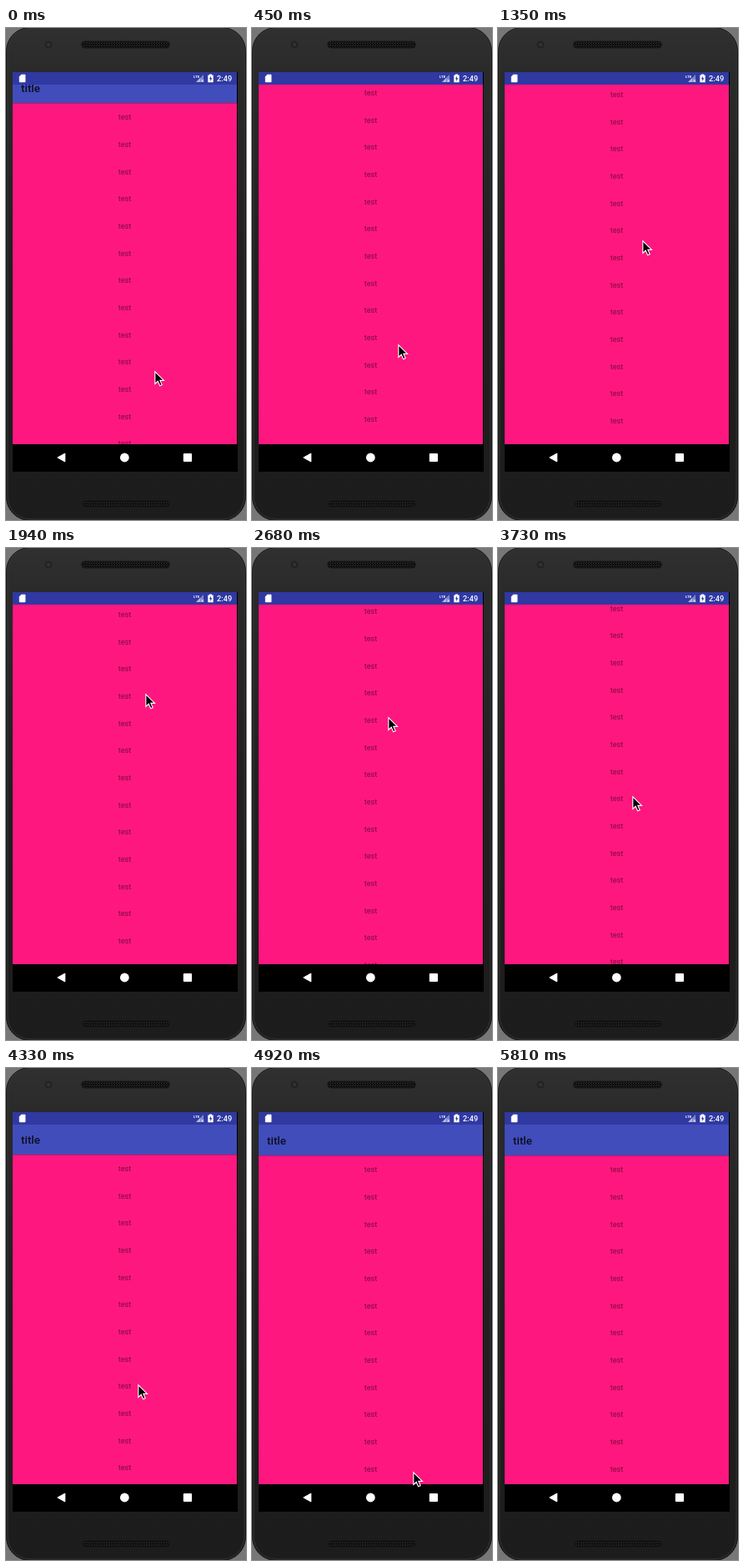
These frames come from a looping animation (288 by 591 pixels, 6.11 s). An HTML page:

```html
<!DOCTYPE html>
<html lang="en">
<head>
<meta charset="utf-8">
<title>Collapsing toolbar</title>
<style>
html, body { margin: 0; width: 100%; height: 100%; overflow: hidden; background: #777; }
svg { display: block; width: 288px; height: 591px; font-family: Roboto, sans-serif; }
</style>
</head>
<body>
<svg viewBox="0 0 288 591">
  <defs>
    <linearGradient id="body" x2="0" y2="1">
      <stop offset="0" stop-color="#303030"/>
      <stop offset=".09" stop-color="#2a2a2a"/>
      <stop offset=".5" stop-color="#202020"/>
      <stop offset="1" stop-color="#1c1c1c"/>
    </linearGradient>
    <pattern id="mesh" width="3" height="3" patternUnits="userSpaceOnUse">
      <rect width="3" height="3" fill="#0e0e0e"/>
      <rect width="1" height="1" fill="#333"/>
      <rect x="1" y="2" width="1" height="1" fill="#2a2a2a"/>
    </pattern>
    <clipPath id="content"><rect x="8" y="68" width="269" height="432"/></clipPath>
  </defs>

  <rect x=".5" y="-.5" width="287" height="592" rx="28" fill="url(#body)" stroke="#161616"/>
  <rect x="2" y="1" width="284" height="589" rx="27" fill="none" stroke="#343434"/>
  <circle cx="51" cy="20" r="4.5" fill="#232323"/>
  <circle cx="51" cy="20" r="2" fill="#353535"/>
  <g fill="url(#mesh)" stroke="#191919">
    <rect x="90.5" y="16" width="106" height="8" rx="4"/>
    <rect x="91.5" y="567.5" width="105" height="8" rx="4"/>
  </g>
  <rect x="8" y="53" width="270" height="480"/>

  <g clip-path="url(#content)">
    <rect x="8" y="68" width="269" height="432" fill="#ff1780"/>
    <g id="list" font-size="9.2" text-anchor="middle" fill-opacity=".52"></g>
    <g id="toolbar">
      <rect x="8" y="105" width="269" height="1" fill-opacity=".2"/>
      <rect x="8" y="60" width="269" height="45" fill="#414dbb"/>
      <text x="18" y="91.5" font-size="13.4" font-weight="500" fill="#0d0f22">title</text>
    </g>
  </g>

  <rect x="8" y="53" width="269" height="15" fill="#3039a2"/>
  <g fill="#fff">
    <path d="M18.4 55.8h4.2q.8 0 .8.8v7.8q0 .8-.8.8h-6q-.8 0-.8-.8v-6z"/>
    <path d="M228 65l9-9v9z" fill-opacity=".4"/>
    <path d="M228 65l5-5v5z" fill-opacity=".4"/>
    <text x="225" y="59.5" font-size="4.4" font-weight="700">LTE</text>
    <path d="M234.3 62l3 3m0-3l-3 3" stroke="#fff" stroke-width=".8"/>
    <path d="M244 55.5h3v1h1.7v8.7h-6.4v-8.7h1.7z"/>
    <path d="M246 57.7l-2.2 3.6h1.4v2.6l2.2-3.7h-1.4z" fill="#3039a2"/>
    <text x="253" y="64" font-size="9.2" font-weight="500">2:49</text>
    <path d="M61.8 516l9-5v10z" stroke="#fff" stroke-linejoin="round"/>
    <circle cx="142.3" cy="516" r="5.4"/>
    <rect x="212.8" y="511" width="10.2" height="10" rx="1"/>
  </g>

  <path id="pointer" d="M.8 1.8v14.7l3.4-3.2 2.4 5.5 2.6-1.1-2.4-5.3h4.7z" stroke="#fff" stroke-width="1.1"/>
</svg>
<script>
const LOOP = 6110, STEP = 149, LAST = 39, ROW = 32.67, BAR = 37;
const el = id => document.getElementById(id);

// Drag up, drag back down, then leave: time, pointer x, pointer y, list scroll
const path = [
  [0, 178, 411, -15],
  [450, 175, 379, -44.5],
  [1350, 173, 253, -174],
  [2050, 166, 170, -241],
  [2680, 163, 202, -209.3],
  [3730, 161, 298, -114.3],
  [4330, 158, 380, -1],
  [4470, 157, 403, 0],
  [5220, 213, 512, 0],
  [5370, 213, 512, 0],
  [5810, 207, 592, 0]
];

// Monotone cubic through one column of the path
function at(t, col) {
  const end = path.length - 1;
  const secant = i => (path[i + 1][col] - path[i][col]) / (path[i + 1][0] - path[i][0]);
  const slope = i => {
    if (i === 0) return secant(0);
    if (i === end) return secant(end - 1);
    const a = secant(i - 1), b = secant(i);
    return a * b > 0 ? 2 * a * b / (a + b) : 0;
  };
  const next = path.findIndex(key => key[0] > t);
  if (next < 0) return path[end][col];
  const i = next - 1, h = path[next][0] - path[i][0];
  const u = (t - path[i][0]) / h, w = 1 - u;
  return w * w * ((1 + 2 * u) * path[i][col] + u * h * slope(i))
       + u * u * ((1 + 2 * w) * path[next][col] - w * h * slope(next));
}

const move = (id, x, y) => el(id).setAttribute("transform", `translate(${x} ${y})`);

el("list").innerHTML = Array.from({ length: 24 }, (_, i) =>
  `<text x="142.5" y="${125.2 + i * ROW}">test</text>`).join("");

function draw(now) {
  const step = Math.min(LAST, Math.floor((now % LOOP + 8) / STEP));
  const t = step * STEP;
  const scroll = at(t, 3);
  move("list", 0, scroll);
  move("toolbar", 0, Math.max(Math.round(scroll), -BAR - 3));
  move("pointer", Math.round(at(t, 1)), Math.round(at(t, 2)));
}

const start = performance.now();
function tick() {
  draw(performance.now() - start);
  requestAnimationFrame(tick);
}
tick();
</script>
</body>
</html>
```
